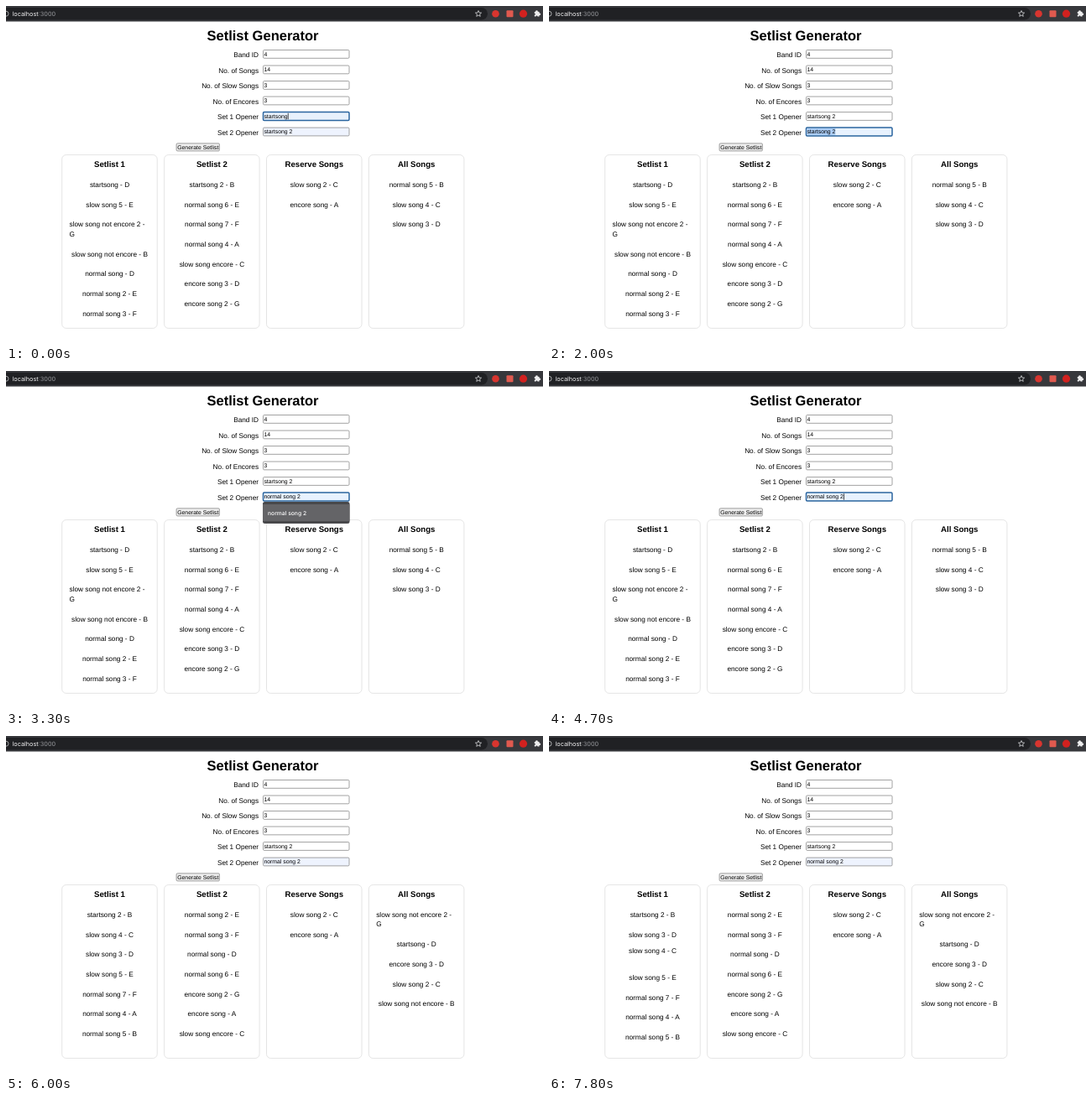
An HTML page with a canvas that plays this animation: 640 by 402 pixels, repeating every 8000 ms.

```html
<!DOCTYPE html>
<html lang="en">
<head>
<meta charset="utf-8">
<title>Setlist Generator</title>
<style>
html, body { margin: 0; width: 100%; height: 100%; overflow: hidden; background: #fff; }
canvas { display: block; width: 640px; height: 402px; }
</style>
</head>
<body>
<canvas id="stage"></canvas>
<script>
const LOOP = 8000, W = 640, H = 402;
const SANS = '"Liberation Sans", Arial, sans-serif';
const UI = 'Inter, Roboto, sans-serif';
const canvas = document.getElementById('stage');
const ctx = canvas.getContext('2d');
const ratio = window.devicePixelRatio || 1;
canvas.width = W * ratio;
canvas.height = H * ratio;

const LABELS = ['Band ID', 'No. of Songs', 'No. of Slow Songs', 'No. of Encores', 'Set 1 Opener', 'Set 2 Opener'];
const HEADINGS = ['Setlist 1', 'Setlist 2', 'Reserve Songs', 'All Songs'];
const RESERVE = ['slow song 2 - C', 'encore song - A'];
const BEFORE = [
  ['startsong - D', 'slow song 5 - E', 'slow song not encore 2 -\nG', 'slow song not encore - B',
    'normal song - D', 'normal song 2 - E', 'normal song 3 - F'],
  ['startsong 2 - B', 'normal song 6 - E', 'normal song 7 - F', 'normal song 4 - A',
    'slow song encore - C', 'encore song 3 - D', 'encore song 2 - G'],
  RESERVE,
  ['normal song 5 - B', 'slow song 4 - C', 'slow song 3 - D']
];
const AFTER = [
  ['startsong 2 - B', 'slow song 4 - C', 'slow song 3 - D', 'slow song 5 - E',
    'normal song 7 - F', 'normal song 4 - A', 'normal song 5 - B'],
  ['normal song 2 - E', 'normal song 3 - F', 'normal song - D', 'normal song 6 - E',
    'encore song 2 - G', 'encore song - A', 'slow song encore - C'],
  RESERVE,
  ['slow song not encore 2 -\nG', 'startsong - D', 'encore song 3 - D', 'slow song 2 - C', 'slow song not encore - B']
];

// Each entry takes over at its start time.
const SET1 = [
  [0, { text: 'startsong', focus: true, caret: true, fill: '#e8f1fc' }],
  [200, { caret: false }],
  [700, { text: 'startsong ', caret: true, fill: '#fff' }],
  [800, { text: 'startsong 2' }],
  [1300, { caret: false }],
  [1600, { focus: false }]
];
const SET2 = [
  [0, { text: 'startsong 2', fill: '#eef3fe' }],
  [1600, { focus: true, selected: true, fill: '#e8f2fe' }],
  [2300, { text: 'n', selected: false, caret: true, fill: '#fff', menu: ['normal song 2', 'new song'] }],
  [2500, { text: 'no', menu: ['normal song 2'] }],
  [2600, { text: 'nor' }],
  [2700, { text: 'norm' }],
  [3200, { caret: false }],
  [3300, { text: 'normal song 2', fill: '#e8f2fe', active: true }],
  [3700, { menu: null, caret: true }],
  [4200, { caret: false }],
  [4700, { caret: true }],
  [5000, { caret: false, focus: false, fill: '#eef3fe' }]
];

function stateAt(track, t) {
  return Object.assign({}, ...track.filter(([start]) => start <= t).map(([, change]) => change));
}

function write(text, x, y, size, { align = 'left', color = '#000', weight = 400, family = SANS } = {}) {
  ctx.font = `${weight} ${size}px ${family}`;
  ctx.textAlign = align;
  ctx.fillStyle = color;
  ctx.fillText(text, x, y);
}

function box(x, y, w, h, r, fill, stroke, line = 1) {
  ctx.beginPath();
  ctx.roundRect(x, y, w, h, r);
  if (fill) { ctx.fillStyle = fill; ctx.fill(); }
  if (stroke) { ctx.strokeStyle = stroke; ctx.lineWidth = line; ctx.stroke(); }
}

function disc(x, y, r, color) {
  ctx.beginPath();
  ctx.arc(x, y, r, 0, Math.PI * 2);
  ctx.fillStyle = color;
  ctx.fill();
}

function drawStar(x, y) {
  ctx.beginPath();
  for (let i = 0; i < 10; i++) {
    const angle = i * Math.PI / 5 - Math.PI / 2, r = i % 2 ? 1.7 : 3.8;
    ctx.lineTo(x + r * Math.cos(angle), y + r * Math.sin(angle));
  }
  ctx.closePath();
  ctx.strokeStyle = '#d5d6d8';
  ctx.lineWidth = 0.8;
  ctx.stroke();
}

function drawToolbar() {
  box(0, 0, W, 18.5, 0, '#37383c');
  box(-20, 2, 594, 14.5, 7.25, '#202124');
  ctx.beginPath();
  ctx.arc(0, 9.2, 3, 0, Math.PI * 2);
  ctx.strokeStyle = '#b5b6b8';
  ctx.lineWidth = 0.9;
  ctx.stroke();
  write('localhost', 7.5, 12, 7.3, { color: '#f1f1f2', family: UI });
  const end = 7.5 + ctx.measureText('localhost').width;
  write(':3000', end, 12, 7.3, { color: '#96989c', family: UI });
  drawStar(563, 9.3);
  disc(583.5, 9.2, 4.3, '#d8352f');
  box(596.5, 5.2, 8, 8, 1, '#e0594f');
  disc(616.5, 9.2, 4.6, '#d2211f');
  box(629.8, 6.8, 5.8, 5.8, 0.7, '#eeeeef');
  disc(632.5, 6.5, 1.3, '#eeeeef');
  disc(635.9, 9.7, 1.3, '#eeeeef');
  disc(629.9, 9.7, 1, '#37383c');
  disc(632.5, 12.5, 1, '#37383c');
}

function drawInput(row, { text, fill = '#fff', focus, caret, selected }) {
  const y = 52.5 + row * 18.52;
  box(306.5, y, 102.5, 9.8, 1.2, fill, focus ? '#2b659f' : '#8b8b8b', focus ? 1.5 : 0.8);
  ctx.font = `6.87px ${SANS}`;
  const width = ctx.measureText(text).width;
  if (selected) box(307.4, y + 1, width, 7.8, 0, '#accef7');
  write(text, 307.4, y + 7.3, 6.87);
  if (caret) box(307.6 + width, y + 1.1, 0.7, 7.6, 0, '#000');
}

function drawMenu({ menu, active }) {
  if (!menu) return;
  box(306, 156, 103.5, 6 + 20 * menu.length, 2.5, '#48484b');
  if (active) box(306, 159, 103.5, 20, 0, '#646467');
  menu.forEach((item, i) => write(item, 312, 171.7 + 20 * i, 6.75, { color: '#fff', weight: 500, family: UI }));
}

// Vertical offset of an item while the second one is dragged below the third.
function dragOffset(index, t) {
  if (t < 7300 || index === 0) return 0;
  const step = Math.min(5, Math.floor((t - 7300) / 100));
  if (index === 1) return 16.7 + step * 0.6;
  if (index === 2) return -23.65 + 10.7 * 0.15 ** step;
  return 3.9;
}

function drawColumn(col, songs, t) {
  const x = 66.7 + col * 121.9, center = x + 56.8;
  box(x, 177.6, 113.5, 206.8, 5, null, '#dedede', 0.8);
  write(HEADINGS[col], center, 191.7, 9.65, { align: 'center', weight: 700 });
  let y = 215.8;
  songs.forEach((song, i) => {
    const lines = song.split('\n');
    const shift = col === 0 ? dragOffset(i, t) : 0;
    lines.forEach((line, n) => {
      const wrapped = lines.length > 1;
      write(line, wrapped ? x + 8.8 : center, y + shift + n * 11.6, 8.25, { align: wrapped ? 'left' : 'center' });
    });
    y += 23.7 + (lines.length - 1) * 11.6;
  });
}

function draw(t) {
  ctx.setTransform(ratio, 0, 0, ratio, 0, 0);
  ctx.textRendering = 'geometricPrecision';
  box(0, 0, W, H, 0, '#fff');
  drawToolbar();
  write('Setlist Generator', 306, 41.2, 16.5, { align: 'center', weight: 700 });

  const set2 = stateAt(SET2, t);
  const fields = ['4', '14', '3', '3'].map(text => ({ text }));
  fields.push(stateAt(SET1, t), set2);
  LABELS.forEach((label, i) => {
    write(label, 301, 61.3 + i * 18.52, 8.25, { align: 'right' });
    drawInput(i, fields[i]);
  });

  const pressed = t >= 5000 && t < 6000;
  box(203.1, 163.9, 51.3, 9, 1.2, '#efefef', pressed ? '#555' : '#858585', 0.8);
  write('Generate Setlist', 228.8, 170.9, 6.87, { align: 'center' });

  (t < 5100 ? BEFORE : AFTER).forEach((songs, i) => drawColumn(i, songs, t));
  drawMenu(set2);
}

function tick() {
  draw(performance.now() % LOOP);
  requestAnimationFrame(tick);
}
tick();
</script>
</body>
</html>
```
